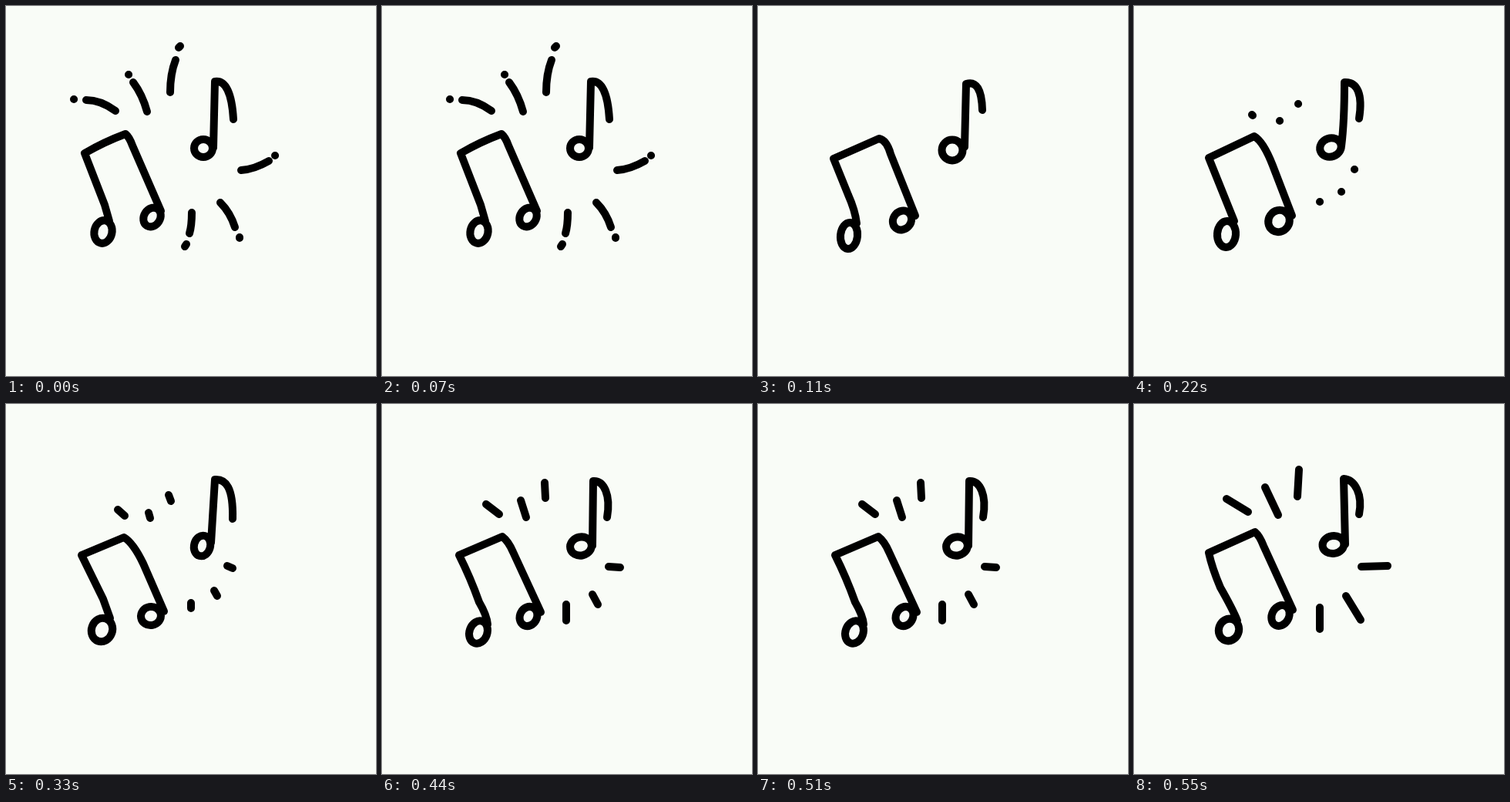
An HTML page with a canvas that plays this animation: 480 px wide and 480 px high, repeating every 0.66 s.

```html
<!DOCTYPE html>
<html lang="en">
<head>
<meta charset="utf-8">
<title>Music notes</title>
<style>
  html, body { margin: 0; height: 100%; overflow: hidden; background: #f9fcf7; }
  canvas { display: block; width: 100vmin; height: 100vmin; }
</style>
</head>
<body>
<canvas id="stage" width="480" height="480"></canvas>
<script>
const STEP = 110;
const ctx = document.getElementById('stage').getContext('2d');

// Each drawing: stems as one path, note heads as [cx, cy, rx, ry, tilt], rays around them.
const drawings = [
  {
    stems: 'M134 279L128 258L102 191Q128 176 155 166Q160 170 164 181L201 266 M269 184L271 98C285 96 293 113 295 147',
    heads: [[126, 293, 11.5, 15, 12], [189.5, 274, 10.5, 13, 32], [256, 184.5, 12, 11.5, 0]],
    rays: 'M104 122Q123 122 142 136 M165 99Q177 115 183 137 M220 70Q213 88 213 112 M305 213Q322 212 341 201 ' +
      'M278 255Q291 268 297 287 M241 268Q241 285 238 295 ' +
      'M88 121h.1 M159 89h.1 M224 54l2 -2 M349 194h.1 M303 300v1 M232 312l2 -3'
  },
  {
    stems: 'M128 282Q126 265 117 245L98 198L157 172Q167 174 172 192L204 272 M268 183L270 101Q290 95 291 135',
    heads: [[118, 298, 11, 17, 6], [187, 278, 11.5, 13, 40], [252, 187, 13.5, 13.5, 0]],
    rays: ''
  },
  {
    stems: 'M130 279L97 197L156 169Q168 176 180 207L205 272 M269 182Q273 150 273 99C290 98 297 115 292 146',
    heads: [[120, 296, 12, 17, 4], [188, 279, 13.5, 14.5, 35], [255, 183.5, 14, 12, -20]],
    rays: 'M153 141l1 1 M189 149h.1 M213 127h.1 M286 212h.1 M269 241h.1 M241 254h.1'
  },
  {
    stems: 'M135 278L126 253L98 196L153 173Q165 180 178 207L205 269 M266 180L271 98C285 97 295 108 294 149',
    heads: [[124.5, 293, 13.5, 15.5, 20], [188, 275, 13, 12, -10], [254.5, 184, 10.5, 13.5, 15]],
    rays: 'M145 137L154 145 M185 141L187 148 M211 118L214 126 M287 210L294 213 M270 242L274 249 M240 258L240 265'
  },
  {
    stems: 'M137 286Q136 274 126 257Q115 226 100 196L156 172Q164 178 170 192L206 270 M273 184L274 100C288 99 297 118 292 147',
    heads: [[125, 296, 11.5, 15, 20], [190, 275.5, 11, 13, 28], [258, 184.5, 14, 12, -12]],
    rays: 'M135 130L152 143 M180 125L187 147 M211 102L212 122 M294 211L309 212 M273 247L280 260 M239 260L239 281'
  },
  {
    stems: 'M134 281Q128 266 112 238Q101 212 97 193L157 166Q163 171 168 184L206 267 M274 182L272 97C287 98 297 118 292 143',
    heads: [[123, 293, 13, 14.5, 20], [190, 274.5, 11, 14, 28], [258.5, 182.5, 14, 11.5, -8]],
    rays: 'M120 123L148 140 M170 108L187 144 M214 85L212 120 M295 211L329 210 M275 249L294 280 M241 264L241 292'
  }
];

let shown = -1;

function draw({ stems, heads, rays }) {
  ctx.fillStyle = '#f9fcf7';
  ctx.fillRect(0, 0, 480, 480);
  ctx.strokeStyle = '#000';
  ctx.lineWidth = 10;
  ctx.lineCap = ctx.lineJoin = 'round';
  const ink = new Path2D(stems + ' ' + rays);
  for (const [x, y, rx, ry, tilt] of heads) {
    const head = new Path2D();
    head.ellipse(x, y, rx, ry, tilt * Math.PI / 180, 0, 2 * Math.PI);
    ink.addPath(head);
  }
  ctx.stroke(ink);
}

function tick() {
  const i = Math.floor(performance.now() / STEP) % drawings.length;
  if (i !== shown) draw(drawings[shown = i]);
  requestAnimationFrame(tick);
}
tick();
</script>
</body>
</html>
```
